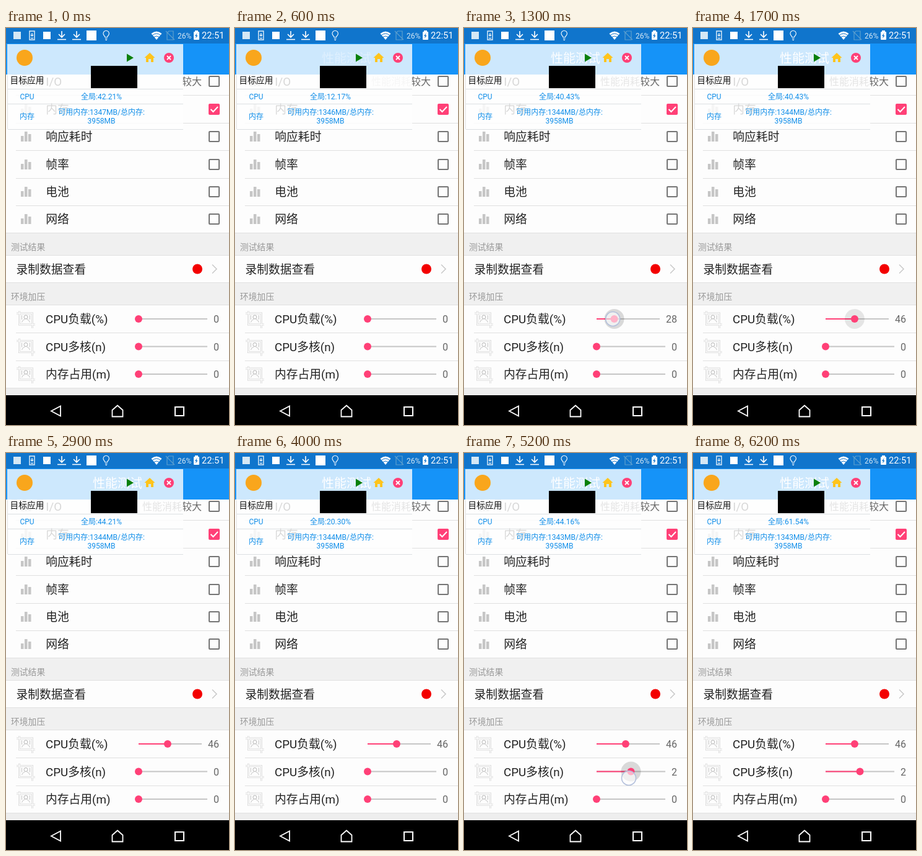
Write an HTML page that moves like this. It is 360x640 px and loops after 6.3 s.

```html
<!DOCTYPE html>
<html lang="zh-CN">
<head>
<meta charset="utf-8">
<style>
html, body { margin: 0; width: 100%; height: 100%; overflow: hidden; background: #000; }
svg { display: block; width: 360px; height: 640px; font-family: Roboto, "Noto Sans CJK SC", "Noto Sans CJK", sans-serif; }
</style>
</head>
<body>
<svg id="stage" viewBox="0 0 360 640"></svg>
<script>
const LOOP = 6300, PINK = '#ff4077', BLUE = '#108ee9', BAR = '#1593f8', STATUS = '#1075cc';

const rect = (x, y, w, h, fill, extra = '') =>
  `<rect x="${x}" y="${y}" width="${w}" height="${h}" fill="${fill}" ${extra}/>`;
const circle = (x, y, r, fill, extra = '') =>
  `<circle cx="${x}" cy="${y}" r="${r}" fill="${fill}" ${extra}/>`;
const line = (d, color, width = 1) =>
  `<path d="${d}" fill="none" stroke="${color}" stroke-width="${width}"/>`;
const shape = (d, fill) => `<path d="${d}" fill="${fill}"/>`;
// Text is placed by its vertical centre.
const text = (s, x, y, size, fill, anchor = 'start', extra = '') =>
  `<text x="${x}" y="${y + size * .36}" font-size="${size}" fill="${fill}" text-anchor="${anchor}" ${extra}>${s}</text>`;
const rule = (y, x = 16) => rect(x, y, 360 - x, 1, '#e0e0e0');

function statusBar() {
  const download = x => line(`M${x} 5V14M${x - 5} 10l5 5 5-5M${x - 7} 18.5h14`, '#fff', 1.6);
  return rect(0, 0, 360, 25, STATUS) +
    rect(12, 6, 12, 12, '#d5e8f5') +
    line('M38 5h8v14h-8zM40 16.5h4M42 8v5M40 11l2 2 2-2', '#e4f0f8', 1.4) +
    rect(60, 6, 12, 12, '#fff') + download(90) + download(114) +
    rect(130, 4, 16, 16, '#fff') +
    line('M160 15c0-2-3-3-3-6a4.7 4.7 0 0 1 9.4 0c0 3-3 4-3 6zM160 17.5h3.5M160.5 19.5h2.5', '#fff', 1.1) +
    shape('M243 19L234.5 9Q243 2 251.5 9Z', '#fff') +
    line('M236.5 11.5Q243 6.5 249.5 11.5M239 14.5Q243 11.5 247 14.5', STATUS) +
    line('M260 8l3-3h7v14h-10zM258 5l14 14', '#5c9fce', 1.2) +
    text('26%', 277, 12.5, 12, '#d5e8f5') +
    rect(303, 6, 9, 13, '#fff', 'rx="1"') + rect(305, 4, 5, 2, '#fff') +
    shape('M308.5 8l-3.5 5h2l-1 4 3.5-5h-2z', STATUS) +
    text('22:51', 352.5, 12, 14.7, '#fff', 'end');
}

function checkRow(label, i) {
  const y = Math.round(86.3 + i * 44.4), checked = i === 1;
  const box = checked
    ? rect(327, y - 9, 18, 18, PINK, 'rx="2"') + line(`M330.5 ${y}l4 4 7.5-8`, '#fff', 2)
    : rect(328, y - 8, 16, 16, 'none', 'rx="1" stroke="#757575" stroke-width="2"');
  return rect(24, y - 1, 4.5, 9, '#c6c6c6') + rect(30, y - 8, 4.5, 16, '#c6c6c6') +
    rect(36, y - 4, 4.5, 12, '#c6c6c6') +
    text(label, 64.3, y, 18.8, '#222') + box + (i < 5 ? rule(y + 22) : '');
}

function sliderRow(label, i) {
  const y = 469 + i * 44.5;
  const crop = `M17 ${y - 9}H42.5V${y + 15}M21.5 ${y - 13}V${y + 9}H47`;
  return line(crop, '#d6d6d6', 3) + line(crop, '#fdfdfd', 1.4) +
    circle(32, y - 3, 3, 'none', 'stroke="#b5b5b5"') +
    line(`M25.5 ${y + 5.5}q1-4 5-5M38.5 ${y + 5.5}q-1-4-5-5M25.5 ${y - 6}v7M38.5 ${y - 6}v7`, '#c4c4c4') +
    text(label, 64, y + .5, 18.8, '#222') + (i < 2 ? rule(Math.round(y + 22)) : '') +
    `<g id="slider${i}"></g>`;
}

function panel() {
  return rect(2, 26, 284, 137, '#fff', 'fill-opacity=".79"') +
    rect(2, 75, 284, 88, '#fff', 'fill-opacity=".15"') +
    line('M3 98.5H286M3 122.5H286M3 163.5H286', '#dce0e2') +
    line('M2.5 76V163', '#e2e2e2') +
    circle(30, 48, 13, '#f9a61c') +
    shape('M195 41.5L206 48 195 54.5Z', '#0b800b') +
    shape('M232 40L223.5 48H226V55H230V50H234V55H238V48H240.5Z', '#ffc41c') +
    circle(263, 48, 8, PINK) + line('M260 45l6 6M266 45l-6 6', '#fff', 1.8) +
    rect(137, 61, 75, 36, '#000') +
    text('目标应用', 6.6, 84, 13.7, '#111') +
    text('CPU', 34, 111, 12, BLUE, 'middle') + text('内存', 34, 143, 12, BLUE, 'middle') +
    text('', 154, 111, 12, BLUE, 'middle', 'id="cpu"') +
    text('', 154, 136, 12, BLUE, 'middle', 'id="memory"') +
    text('3958MB', 154, 150, 12, BLUE, 'middle');
}

const section = (label, y, top, height) =>
  rect(0, top, 360, height, '#f0f0f0') + rule(top, 0) + rule(top + height - 1, 0) +
  text(label, 8, y, 13.8, '#999');

document.getElementById('stage').innerHTML =
  rect(0, 0, 360, 592, '#fdfdfd') + rect(0, 25, 360, 50, BAR) +
  '<g id="ghost">' + text('性能测试', 180, 49, 20, '#fff', 'middle') +
  text('性能消耗', 284, 86.5, 16, '#666', 'end') + '</g>' +
  text('较大', 316, 86.5, 16, '#666', 'end') +
  ['I/O', '内存', '响应耗时', '帧率', '电池', '网络'].map(checkRow).join('') +
  section('测试结果', 353, 330, 37) +
  text('录制数据查看', 16.4, 389, 18.8, '#222') + circle(309, 388.5, 8, '#f30000') +
  line('M333 381.5l7 7-7 7', '#c8c8c8', 1.5) +
  section('环境加压', 433.5, 410, 37) +
  ['CPU负载(%)', 'CPU多核(n)', '内存占用(m)'].map(sliderRow).join('') +
  rect(0, 580, 360, 12, '#eee') + rule(580, 0) + panel() + statusBar() +
  rect(0, 592, 360, 48, '#000') +
  line('M88 609.5V625.5L73 617.5Z', '#fff', 1.8) +
  line('M171.5 626.5V616L180 608.5 188.5 616V626.5Z', '#fff', 1.8) +
  line('M273 611h14v14h-14z', '#fff', 2) + '<g id="touch"></g>';

// [start ms, CPU %, free MB]
const readings = [
  [0, '42.21', 1347], [500, '12.17', 1346], [1200, '40.43', 1344], [2300, '44.21', 1344],
  [3700, '20.30', 1344], [4700, '44.16', 1343], [5900, '61.54', 1343]
];
const sliders = [
  { max: 100, goal: 46, down: 700, drag: 1000, stop: 1500, up: 1600, from: 209, to: 261, fingerY: 469 },
  { max: 4, goal: 2, down: 4700, drag: 4850, stop: 5150, up: 5400, from: 212, to: 266, fingerY: 524 },
  { max: 100, goal: 0, down: LOOP }
];
const clamp = v => Math.max(0, Math.min(1, v));
const byId = id => document.getElementById(id);

function draw(now) {
  const t = Math.floor(now % LOOP / 100) * 100;
  const [, cpu, free] = readings.findLast(r => r[0] <= t);
  byId('cpu').textContent = `全局:${cpu}%`;
  byId('memory').textContent = `可用内存:${free}MB/总内存:`;
  byId('ghost').setAttribute('opacity', clamp((t - 200) / 1200));

  let touch = '';
  sliders.forEach((s, i) => {
    const y = 469 + i * 44.5;
    const p = s.goal ? clamp((t - s.drag) / (s.stop - s.drag)) : 0;
    const value = Math.round(s.goal * p);
    const end = value > 9 ? 316 : 325;
    const x = 214 + (end - 214) * value / s.max;
    const ripple = t >= s.drag ? clamp(1 - (t - s.up) / 300) : 0;
    byId('slider' + i).innerHTML =
      line(`M214 ${y}H${end}`, '#c6c6c6', 1.8) + line(`M214 ${y}H${x}`, PINK, 2) +
      (ripple ? circle(x, y, 16, '#000', `opacity="${.14 * ripple}"`) : '') +
      circle(x, y, 6, PINK) + text(value, 344, y + .5, 16, '#666', 'end');
    if (t >= s.down && t < s.up)
      touch = circle(s.from + (s.to - s.from) * p, s.fingerY, 11.5, '#fff',
        'fill-opacity=".6" stroke="#b4c0dc" stroke-width="1.6"');
  });
  byId('touch').innerHTML = touch;
}

function tick() {
  draw(performance.now());
  requestAnimationFrame(tick);
}
tick();
</script>
</body>
</html>
```
